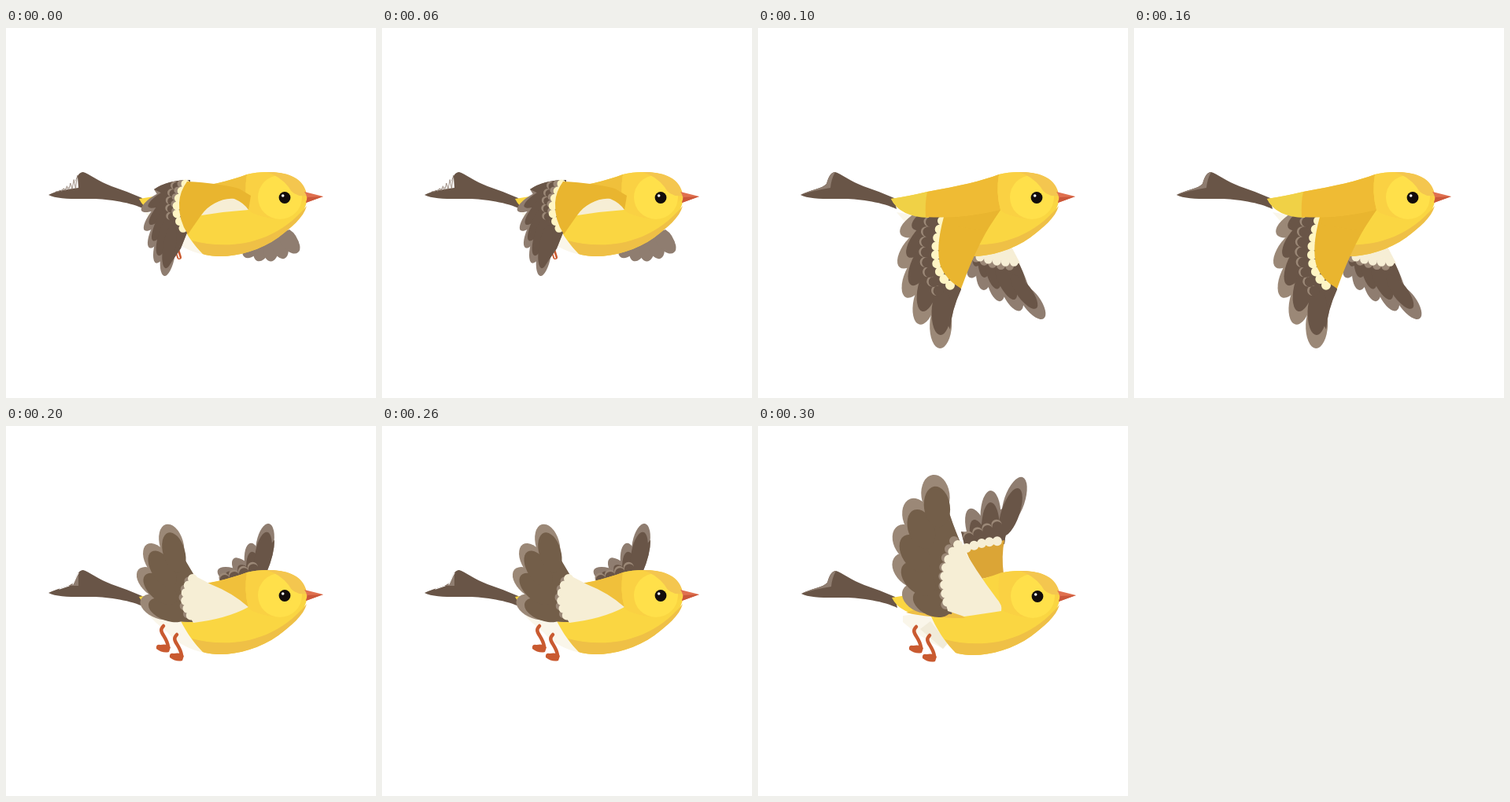
Recreate the animation shown at these times as an HTML page. Size 470x470 px, loop 0.4 s.

```html
<!DOCTYPE html>
<html lang="en">
<head>
<meta charset="utf-8">
<title>Flying bird</title>
<style>
  html, body { margin: 0; width: 100%; height: 100%; overflow: hidden; background: #fff; }
  svg { display: block; width: 100vw; height: 100vh; }
  .pose { visibility: hidden; animation: show 400ms step-end infinite; }
  @keyframes show {
    0% { visibility: visible; }
    25%, 100% { visibility: hidden; }
  }
</style>
</head>
<body>
<svg id="stage" viewBox="0 0 470 470"></svg>
<script>
const C = {
  dark: '#695547', warm: '#735e49', grey: '#8f7d70', pale: '#9b8877',
  gold: '#e9b52f', band: '#efbb34', back: '#f0c03b', yellow: '#fad642', shade: '#efc046',
  cream: '#f6eed5', lemon: '#fff5c4', belly: '#faf6ea', foot: '#c95a30'
};

const shape = (d, fill) => `<path d="${d}" fill="${fill}"/>`;
const disc = (x, y, r, fill) => `<circle cx="${x}" cy="${y}" r="${r}" fill="${fill}"/>`;
const line = (d, color, width, dash = 'none') =>
  `<path d="${d}" fill="none" stroke="${color}" stroke-width="${width}" stroke-linecap="round" stroke-dasharray="${dash}"/>`;
const shift = (x, y, art) => `<g transform="translate(${x} ${y})">${art}</g>`;

// A row of round feather ends along a path, full or as thin arcs
const beads = (d, color, size, gap) => line(d, color, size, `0 ${gap}`);
const arcs = (d, dx, dy, gap) =>
  beads(d, C.pale, gap, gap) + shift(dx, dy, beads(d, C.dark, gap, gap));

const bezier = ([a, b, c], t) =>
  [0, 1].map(k => (1 - t) ** 2 * a[k] + 2 * t * (1 - t) * b[k] + t * t * c[k]);

// Feathers fan out from a hub, their tips evenly spaced on a curve
function fan({ tips, hub, count, length, width, edge }, inset, fill) {
  const feathers = Array.from({ length: count }, (_, i) => {
    const [x, y] = bezier(tips, i / (count - 1));
    const angle = Math.atan2(y - hub[1], x - hub[0]);
    const reach = length + inset;
    return { x: x - reach * Math.cos(angle), y: y - reach * Math.sin(angle), turn: angle * 180 / Math.PI };
  });
  const web = 'M' + feathers.map(f => `${f.x} ${f.y}`).join('L') + edge + 'Z';
  return shape(web, fill) + feathers.map(f =>
    `<ellipse rx="${length}" ry="${width - inset / 10}" fill="${fill}" transform="translate(${f.x} ${f.y}) rotate(${f.turn})"/>`
  ).join('');
}
const wing = (form, inset, outer = C.grey, inner = C.dark) => fan(form, 0, outer) + fan(form, inset, inner);

const tail = light =>
  shape('M54 212C65 206 82 204 87 198Q91 183 98 183C105 185 118 195 134 201Q155 208 173 216L176 230C160 222 130 217 110 217C90 217 65 218 54 212Z', C.dark) + light;
const fullTail = tail(shape('M54 212C65 206 82 204 87 198Q91 183 98 183Q93 192 92 203Q72 206 54 212Z', C.grey));
const scratches = Array.from({ length: 14 }, (_, i) =>
  `${62 + i * 2.2} ${209 - i * .4 - (i % 2) * (1 + i * i / 11)}`).join('L');
const wornTail = tail(shape('M64 208C74 205 83 203 87 197L91 189L92 203Q76 205 64 208Z', '#fff') +
  line('M' + scratches, C.grey, .8));
const chippedTail = tail(shape('M80 203Q87 200 89 191L92 186L92 203Z', C.grey) +
  line('M68 207L80 203M85 201L90 190L92 187', '#fff', 1.2));

const body =
  shape('M169 217Q190 214 215 208C255 201 285 194 306 186C325 181 352 182 366 190C375 195 381 205 383 215C381 236 364 252 346 266C322 283 292 291 268 290Q255 289 250 287C235 272 225 255 218 239Q180 240 169 217Z', C.yellow) +
  shape('M236 270C278 281 338 279 382 226C378 241 362 254 346 266C322 283 292 291 268 290Q255 289 250 287Q242 279 236 270Z', C.shade);
const backPatch = shape('M225 204C255 201 285 194 306 186Q302 210 308 231L260 215Z', C.back);

const head =
  shape('M306 186C325 181 352 182 366 190C375 195 381 205 383 215L350 243Q316 240 308 231Q302 208 306 186Z', '#fad143') +
  disc(348, 215, 28, '#ffe04a') +
  shape('M331 183C356 182 380 190 382 213Q365 215 359 202Q348 188 331 183Z', '#f4c64f') +
  shape('M379 208L403 214L381 222Q384 214 379 208Z', '#e0704f') +
  shape('M383 215L403 214L381 222Z', '#ca573a') +
  disc(354, 215.5, 7.4, '#120c0b') + disc(351.7, 213, 1.8, '#fff');

const underside = shape('M176 234Q205 238 222 246Q235 270 252 288Q222 282 204 261Q189 250 176 234Z', C.belly);
const leg =
  line('M200 254C192 262 204 266 206 280', C.foot, 4.5) +
  shape('M207 287Q199 289 191 283Q190 277 196 278Q205 276 209 281Z', C.foot);
const legs = leg + shift(17, 11, leg);

function sweepDown() {
  const far = fan({
    tips: [[303, 291], [335, 305], [371, 285]], hub: [338, 245],
    count: 5, length: 17, width: 10, edge: 'L373 277Q370 262 360 256L310 275'
  }, 0, C.grey);
  const foot = line('M217 281L220 291', C.foot, 6) + line('M218 286L220 292', '#fff', 1.5);
  const near =
    wing({
      tips: [[172, 232], [178, 285], [201, 315]], hub: [220, 205],
      count: 5, length: 28, width: 9, edge: 'L209 299L222 280L232 255L234 193Q205 193 188 205'
    }, 10) +
    arcs('M214 200Q203 220 210 247', 2.5, 1, 10) +
    beads('M222 198Q209 220 217 240', C.pale, 9, 9) +
    beads('M228 198Q212 225 219 242T228 256', C.lemon, 11, 10) +
    shape('M230 195Q270 197 296 204L311 213L308 231L285 217Q260 220 247 239L231 262Q219 244 220 222Q221 207 230 195Z', C.gold) +
    shape('M248 238C257 224 276 215 290 217Q302 222 308 231Q278 233 248 238Z', C.cream);
  return far + foot + underside + wornTail + body + backPatch + head + near;
}

function lowWings() {
  const far =
    wing({
      tips: [[269, 317], [300, 351], [363, 369]], hub: [290, 270],
      count: 5, length: 26, width: 11, edge: 'Q346 327 329 294L274 289'
    }, 16) +
    beads('M277 292Q304 304 326 302', C.pale, 11, 11) +
    shape('M274 285L322 278L333 299L280 292Z', C.cream) +
    beads('M282 291Q306 299 329 297', C.cream, 11, 11);
  const bodyTop =
    shape('M169 217Q190 214 215 208L217 241Q180 240 169 217Z', '#f0d146') +
    shape('M215 208C255 201 285 194 306 186Q302 210 308 231Q265 243 213 240Q212 221 215 208Z', C.band);
  const near =
    wing({
      tips: [[181, 262], [170, 350], [231, 407]], hub: [238, 230],
      count: 5, length: 30, width: 14, edge: 'L244 383Q246 358 258 332L240 239L200 239'
    }, 17, C.pale) +
    arcs('M217 246Q204 285 218 316T232 336', 2.5, .5, 13) +
    beads('M234 245Q221 284 229 305T252 331', C.lemon, 12, 11) +
    shape('M236 240Q270 240 308 231Q281 267 258 331Q239 320 232 303Q225 280 236 240Z', C.gold);
  return far + underside + fullTail + body + near + bodyTop + head +
    shape('M240 241Q275 239 308 231L290 258L238 250Z', C.gold);
}

function risingWings() {
  const far =
    wing({
      tips: [[269, 183], [298, 165], [334, 124]], hub: [318, 205],
      count: 4, length: 26, width: 11, edge: 'L341 145Q341 163 331 186L270 199'
    }, 11) +
    arcs('M277 193Q300 186 324 174', 1, 2.5, 13);
  const near =
    wing({
      tips: [[171, 221], [157, 158], [203, 125]], hub: [238, 245],
      count: 4, length: 26, width: 15, edge: 'L217 152Q226 168 238 188L245 249Q210 250 188 238'
    }, 11, C.pale, C.warm) +
    beads('M232 197Q218 220 232 241', C.pale, 11, 11) +
    beads('M237 194Q219 218 237 244', C.cream, 12, 10) +
    shape('M237 189Q251 196 260 201Q288 212 308 230Q280 245 238 250Q218 221 237 189Z', C.cream);
  return far + underside + legs + chippedTail + body + backPatch + head + near;
}

function highWings() {
  const far =
    wing({
      tips: [[269, 105], [289, 79], [336, 65]], hub: [295, 185],
      count: 3, length: 32, width: 13, edge: 'L337 84Q316 119 313 150L264 158L258 134'
    }, 15) +
    arcs('M267 140Q285 132 306 124', 1, 2.5, 13) +
    shape('M263 156L313 145Q309 165 312 188L280 195Z', '#dba536') +
    beads('M265 155Q288 146 311 146', C.cream, 12, 10);
  const under = shape('M183 240L216 236Q226 258 240 275L234 282Q204 267 183 248Z', C.belly) +
    shape('M205 257L218 247L240 275L234 282Z', '#f1ebd9');
  const rump = shape('M187 236Q210 226 250 234L262 243Q215 243 187 236Z', C.shade);
  const near =
    wing({
      tips: [[184, 208], [152, 119], [222, 62]], hub: [245, 235],
      count: 5, length: 26, width: 18, edge: 'L239 98Q246 122 257 148L246 239Q226 238 206 228'
    }, 15, C.pale, C.warm) +
    beads('M249 146Q228 175 239 231', C.pale, 12, 12) +
    beads('M254 151Q228 180 242 230', C.cream, 12, 11) +
    shape('M256 147Q275 182 303 219Q311 228 309 235Q283 239 262 242L241 235Q226 183 256 147Z', C.cream);
  return far + shift(1, 1, under + legs + fullTail + body + rump + head) + near;
}

const step = 100;
const poses = [sweepDown, lowWings, risingWings, highWings];
document.getElementById('stage').innerHTML = poses
  .map((draw, i) => `<g class="pose" style="animation-delay:${(i - poses.length) * step}ms">${draw()}</g>`)
  .join('');
</script>
</body>
</html>
```
